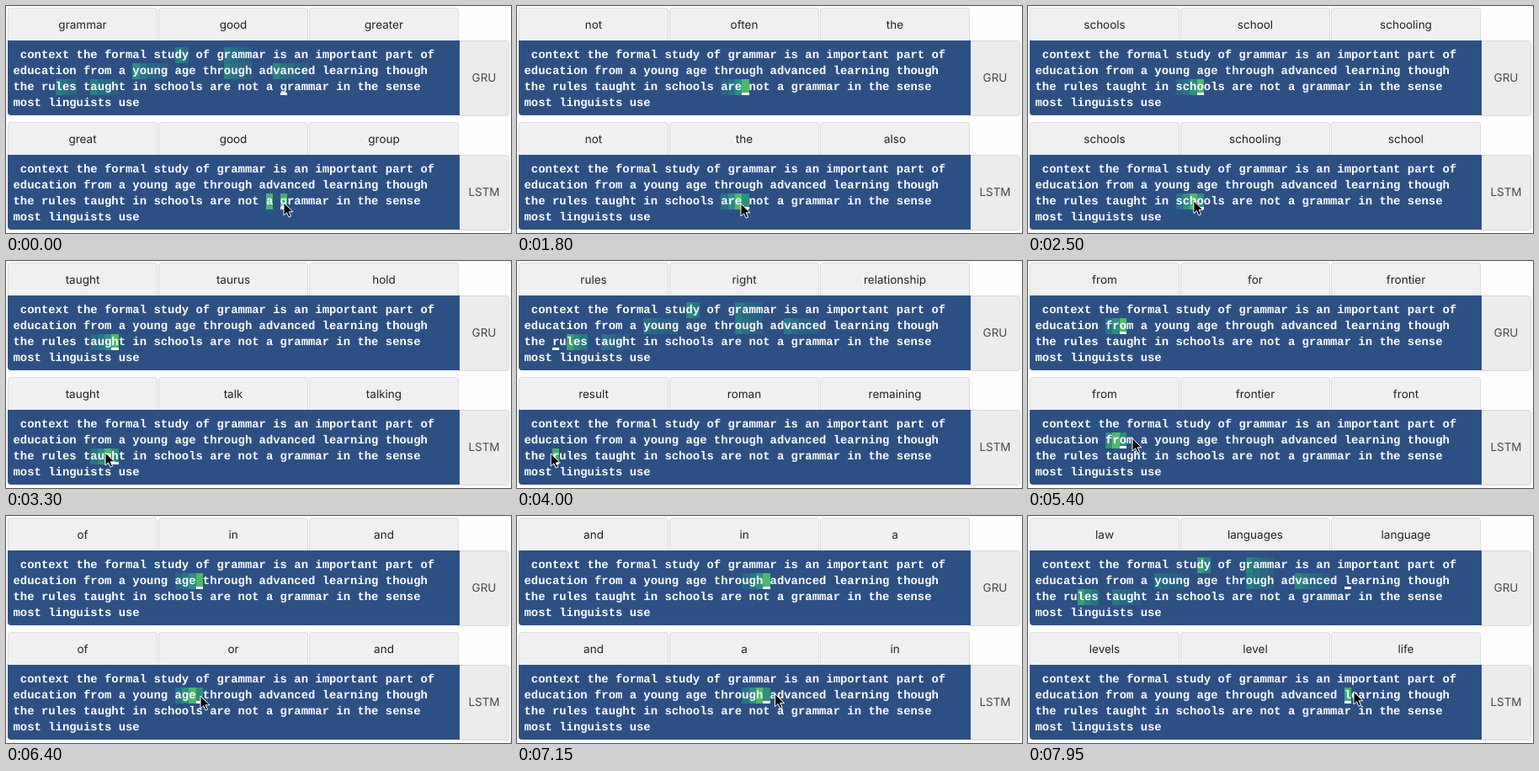
An HTML page with a canvas for the animation above (8 s loop, 600 by 270 pixels).

```html
<!DOCTYPE html>
<html lang="en">
<head>
<meta charset="utf-8">
<title>GRU and LSTM autocomplete</title>
<style>
html, body { margin: 0; width: 100%; height: 100%; overflow: hidden; background: #fefefe; }
body { position: relative; text-rendering: geometricPrecision; }
canvas, svg { position: absolute; left: 0; top: 0; }
.panel { position: absolute; left: 0; width: 600px; height: 136px; font: 13.5px Inter, sans-serif; text-align: center; }
.panel div { position: absolute; box-sizing: border-box; }
.tab { top: 2px; width: 178px; height: 39px; line-height: 40px; color: #222; background: #f0eff1; border: 1px solid #dcdbdd; border-bottom: 0; border-radius: 4px 4px 0 0; }
.side { left: 538px; top: 41px; width: 60px; height: 90px; line-height: 89px; color: #484848; background: #ecebed; border: 1px solid #d8d7d9; border-radius: 0 4px 4px 0; }
.blue { left: 2px; top: 41px; width: 537px; height: 89px; background: #2c5084; border-radius: 0 0 0 4px; z-index: 1; }
pre { position: absolute; margin: 0; left: 8.5px; color: #fff; font: bold 13.92px/19px "Liberation Mono", monospace; }
</style>
</head>
<body>
<script>
const LOOP = 8000, CELL = 8.35, X0 = 8.5, ROW = 19, LAG = 80;
const LINES = [
  " context the formal study of grammar is an important part of",
  "education from a young age through advanced learning though",
  "the rules taught in schools are not a grammar in the sense",
  "most linguists use"
];

// Pointer path: time, x, y
const PATH = [
  [0, 330, 234], [800, 330, 234], [1800, 266, 235], [3300, 118, 228], [3900, 46, 229],
  [4350, 20, 229], [4600, 12, 214], [5400, 124, 211], [6300, 227, 214], [6400, 231, 214], [7950, 387, 209]
];

// Suggestions after typed letters: GRU / LSTM
const SUGGEST = {
  "g": "grammar good greater/great good group",
  "are ": "not often the/not the also",
  "taugh": "taught taurus hold/taught talk talking",
  "r": "rules right relationship/result roman remaining",
  "fro": "from for frontier/from frontier front",
  "age ": "of in and/of or and",
  "l": "law languages language/levels level life"
};
const COMMON = "the of and in a his".split(" ");
const VOCAB = ("the in state are and not with education from rules right relationship taught taurus talk talking that to "
  + "young year years schools school schooling science scholars through throughout three threw advanced advance advantage "
  + "also age ages agent article arms national north nothing is international education educated editor english "
  + "for france frontier front found your youth younger rule ruling russian learning learned least law level").split(" ");

// Places in the text that stay warm at the start of a word
const WARM = ["dy", "ramm", "young", "vance", "ough", "les", "augh"];

const noise = n => {
  const v = Math.sin(n * 127.1 + 11.7) * 43758.5453;
  return v - Math.floor(v);
};
const lastWord = (row, col) => LINES[row].slice(0, col + 1).match(/\S* ?$/)[0];

function wordsFor(row, col, model) {
  const typed = lastWord(row, col);
  if (SUGGEST[typed]) return SUGGEST[typed].split("/")[model].split(" ");
  const found = new Set();
  if (typed.endsWith(" ")) COMMON.slice(col % 4).forEach(w => found.add(w));
  for (let n = typed.length; n >= 0 && found.size < 3; n--)
    VOCAB.filter(w => w.startsWith(typed.slice(0, n))).forEach(w => found.add(w));
  const [a, b, c] = found;
  return model ? [a, c, b] : [a, b, c];
}

// Calls paint(row, col, level), with level from 0 to 1
function heat(row, col, model, paint) {
  const typed = lastWord(row, col), first = typed.length === 1;
  if (!first) {
    const peak = col - model;
    for (let i = Math.min(typed.length, 4) - 1; i >= 0; i--)
      paint(row, col - i, 0.62 ** Math.abs(col - i - peak));
  } else if (model) {
    paint(row, col, 0.9);
    if (LINES[row].slice(0, col).endsWith(" a ")) paint(row, col - 2, 0.95);
  } else {
    WARM.forEach((part, n) => {
      const r = LINES.findIndex(line => line.includes(part));
      const start = LINES[r].indexOf(part), top = 0.3 + 0.5 * noise(row * 60 + col + n);
      [...part].forEach((_, i) => paint(r, start + i, top * 0.7 ** i));
    });
  }
}

const STOPS = [[0, 44, 80, 132], [0.45, 40, 121, 134], [0.75, 56, 157, 119], [1, 80, 184, 108]];
function blend(stops, at) {
  let i = 1;
  while (i < stops.length - 1 && at > stops[i][0]) i++;
  const a = stops[i - 1], b = stops[i], f = (at - a[0]) / (b[0] - a[0]);
  return a.slice(1).map((v, j) => v + (b[j + 1] - v) * f);
}

const add = html => document.body.insertAdjacentHTML("beforeend", html);
const tops = [0, 136];
for (const [m, name] of ["GRU", "LSTM"].entries())
  add(`<div class="panel" style="top:${tops[m]}px">`
    + [2, 181, 360].map(x => `<div class="tab" style="left:${x}px"></div>`).join("")
    + `<div class="blue"></div><div class="side">${name}</div></div>`);
add(`<canvas width="600" height="270" style="z-index:2"></canvas>`);
for (const top of tops) add(`<pre style="top:${top + 50}px;z-index:3">${LINES.join("\n")}</pre>`);
add(`<svg width="600" height="270" style="z-index:4"><path id="arrow" d="M0 0V15L3.6 11.8L6 17.2L8.6 16.1L6.2 10.8H11Z" stroke="#fff"/></svg>`);
const tabs = [...document.querySelectorAll(".panel")].map(p => p.querySelectorAll(".tab"));
const ctx = document.querySelector("canvas").getContext("2d");
const arrow = document.getElementById("arrow");

function fillCell(row, col, top, color, y = 0, h = ROW) {
  const x = Math.round(X0 + col * CELL);
  ctx.fillStyle = color;
  ctx.fillRect(x, top + row * ROW + y, Math.round(X0 + (col + 1) * CELL) - x, h);
}

function hover(row, col) {
  ctx.clearRect(0, 0, 600, 270);
  tops.forEach((offset, m) => {
    const top = offset + 49;
    wordsFor(row, col, m).forEach((w, i) => tabs[m][i].textContent = w);
    heat(row, col, m, (r, c, level) => fillCell(r, c, top, `rgb(${blend(STOPS, level).map(Math.round)})`));
    fillCell(row, col, top, "#fff", 16, 3);
  });
}

let shown = "";
function draw(now) {
  const t = Math.floor(now % LOOP / 50) * 50;
  const [x, y] = blend(PATH, t);
  const [hx, hy] = blend(PATH, Math.max(0, t - LAG));
  const row = hy < 223 ? 1 : 2, col = Math.max(0, Math.floor((hx - X0) / CELL));
  arrow.setAttribute("transform", `translate(${x.toFixed(1)} ${y.toFixed(1)})`);
  if (shown !== row + "," + col) hover(row, col);
  shown = row + "," + col;
  requestAnimationFrame(draw);
}
draw(0);
</script>
</body>
</html>
```
